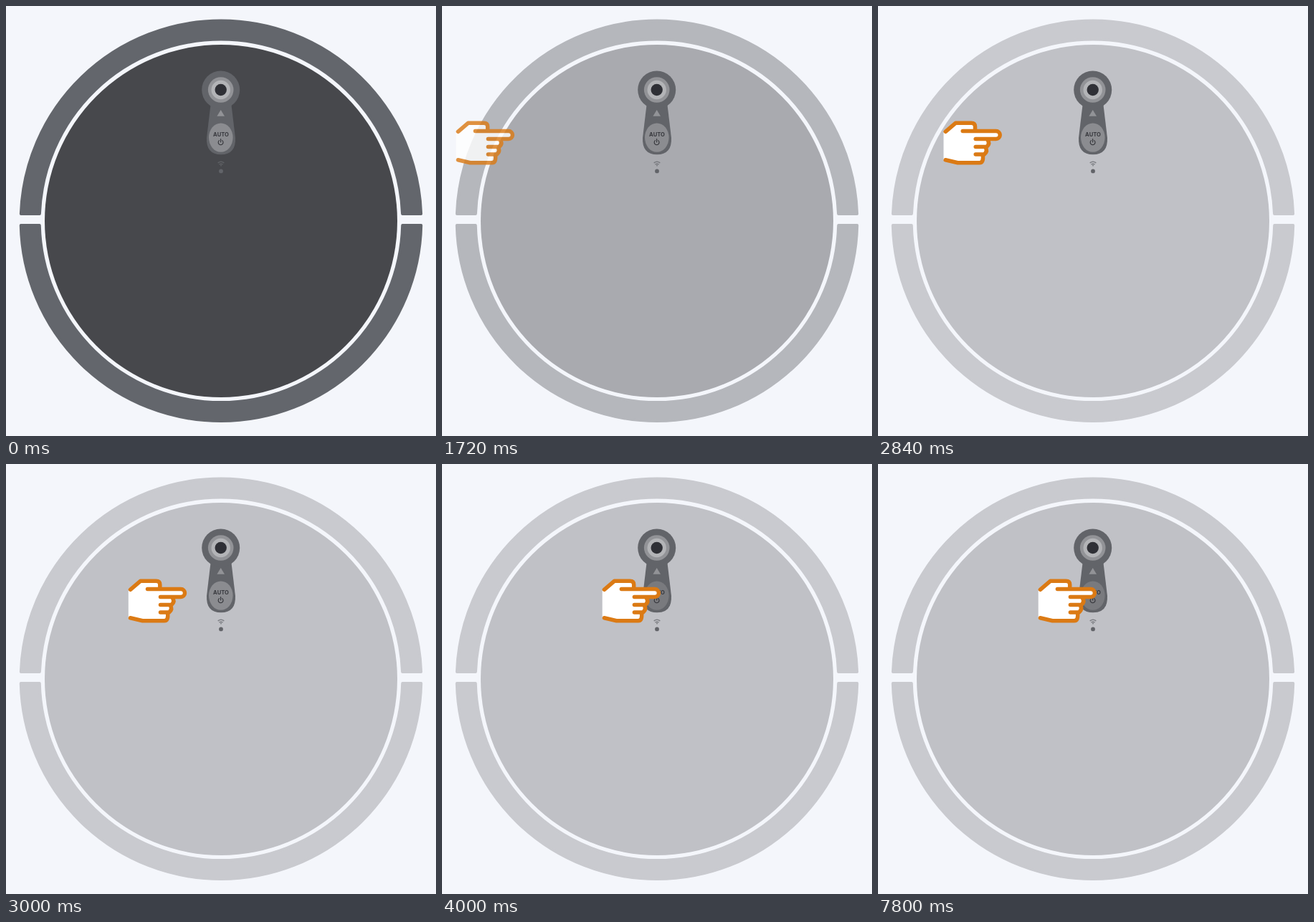
Recreate the animation shown at these times as an HTML page. Size 600x600 px, loop 8 s.

```html
<!DOCTYPE html>
<html lang="en">
<head>
<meta charset="utf-8">
<title>Robot vacuum: press AUTO</title>
<style>
  html, body { margin: 0; width: 100%; height: 100%; overflow: hidden; background: #f4f6fb; }
  svg { display: block; width: 100vw; height: 100vh; }
  .label { font: 700 7.6px Inter, Arial, sans-serif; text-anchor: middle; fill: #38393e; }
  .line { fill: none; stroke-linecap: round; stroke-linejoin: round; }
</style>
</head>
<body>
<svg viewBox="0 0 600 600">
  <g id="ring" stroke-width="4" stroke-linejoin="round">
    <path id="upper"/>
    <path id="lower"/>
  </g>
  <circle id="disc" cx="300" cy="300" r="246"/>

  <g fill="#626469">
    <path d="M286 134 L280 184 Q279 207.3 300 207.3 Q321 207.3 320 184 L314 134 Z"/>
    <circle cx="299.7" cy="117" r="26.5"/>
  </g>
  <circle cx="299.7" cy="117" r="17.8" fill="#929397"/>
  <circle cx="299.7" cy="117" r="13.2" fill="#b3b4b7"/>
  <circle cx="299.7" cy="117" r="8.2" fill="#2f3036"/>
  <path d="M299.7 145 L305 153.8 H294.4 Z" fill="#929397"/>

  <ellipse id="button" cx="299.8" cy="183.6" rx="16.8" ry="20.2"/>
  <text class="label" x="300" y="181.6">AUTO</text>
  <path class="line" stroke="#38393e" stroke-width="1.2"
        d="M297.5 187.6 A3.4 3.4 0 1 0 301.7 187.6 M299.6 185.6 V189.8"/>

  <g opacity=".75">
    <path class="line" stroke="#66686d" stroke-width="1.5"
          d="M296.2 218.6 Q300 215.8 303.8 218.6 M298 220.8 Q300 219.5 302 220.8"/>
    <circle cx="300" cy="222.6" r="1" fill="#66686d"/>
  </g>
  <circle id="led" cx="300" cy="230.4" r="2.9"/>

  <g id="hand">
    <path fill="#fff" d="M22.3 176.5 L39 163.3 H61 Q66.5 163.3 66.5 174.5 H95.5 A5.5 5.5 0 0 1 95.5 185.5
      H84 Q88 191 83 196.5 Q85.5 202 79.5 207 Q79 218.7 73 218.7 H42 L22.3 214.3 Z"/>
    <path class="line" stroke="#db7a14" stroke-width="5.5" d="M25 175.3 L39 163.3 H61 Q66.3 163.3 66.3 168.5 V172
      M49 174.5 H95.5 A5.5 5.5 0 0 1 95.5 185.5 H67
      M83 186 Q88 191.5 82.5 196.5 H67
      M80.5 197 Q84.5 202.5 79 207 H67
      M77 207.5 Q78.5 218.7 72.5 218.7 H42 L25 214.8"/>
  </g>
</svg>
<script>
  const LOOP = 8000, STEP = 40;
  const el = id => document.getElementById(id);

  // Smooth ease from 0 to 1 between two times
  const ease = (t, from, to) => {
    const u = Math.min(1, Math.max(0, (t - from) / (to - from)));
    return u * u * (3 - 2 * u);
  };
  const mix = (a, b, k) => `rgb(${a.map((v, i) => Math.round(v + (b[i] - v) * k))})`;

  const COLORS = {
    ring: [[99, 102, 108], [201, 202, 207]],
    disc: [[71, 72, 76], [192, 193, 198]],
    button: [[139, 140, 144], [121, 122, 126]],
    led: [[98, 100, 105], [66, 181, 60]]
  };
  const paint = (id, k) => {
    const c = mix(...COLORS[id], k);
    el(id).setAttribute('fill', c);
    return c;
  };

  // Half of the bumper, its ends cut level at y
  function bumper(y, sweep) {
    const outer = 279.3, inner = 253.3, cy = 299.8;
    const half = r => Math.sqrt(r * r - (y - cy) ** 2);
    const a = half(outer), b = half(inner);
    return `M${300 - a} ${y} A${outer} ${outer} 0 0 ${sweep} ${300 + a} ${y}` +
      `H${300 + b} A${inner} ${inner} 0 0 ${1 - sweep} ${300 - b} ${y} Z`;
  }
  el('upper').setAttribute('d', bumper(290, 1));
  el('lower').setAttribute('d', bumper(306, 0));

  function draw(t) {
    const fade = ease(t, 1000, 2000);
    el('ring').setAttribute('stroke', paint('ring', fade));
    paint('disc', fade);

    el('hand').setAttribute('opacity', fade);
    el('hand').setAttribute('transform', `translate(${-2.6 + 204 * ease(t, 2600, 3200)} 0)`);
    paint('button', ease(t, 3200, 3460));

    const lit = (t >= 6400 ? 1 : 0) - ease(t, 6520, 6800) + ease(t, 7000, 7260) - ease(t, 7600, 7800);
    paint('led', lit);
  }

  const start = performance.now();
  function tick() {
    const t = (performance.now() - start) % LOOP;
    draw(Math.floor(t / STEP) * STEP);
    requestAnimationFrame(tick);
  }
  tick();
</script>
</body>
</html>
```
